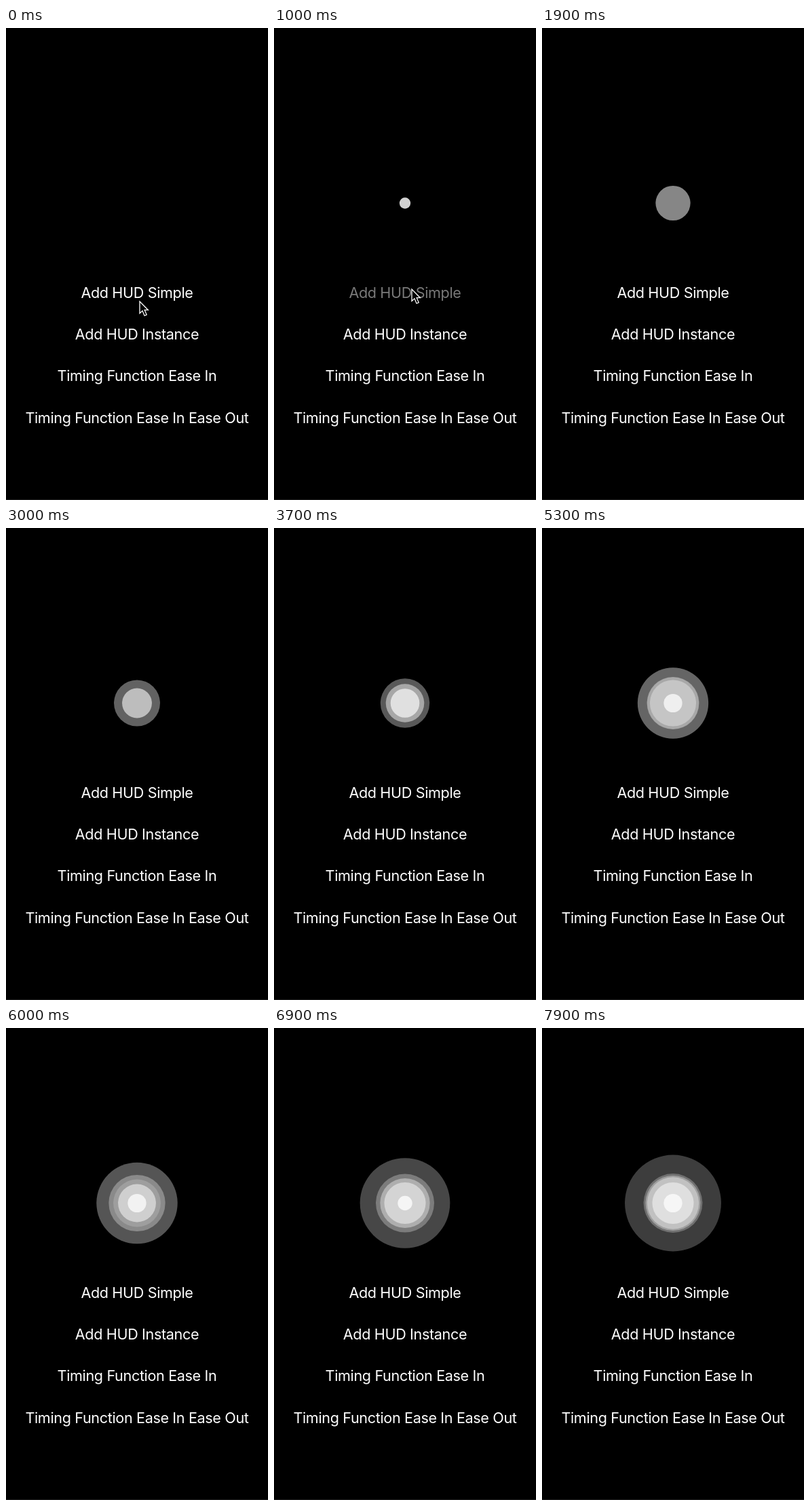
Recreate the animation shown at these times as an HTML page. Size 386x694 px, loop 8 s.

```html
<!DOCTYPE html>
<html lang="en">
<head>
<meta charset="utf-8">
<title>Pulse HUD</title>
<style>
  html, body { margin: 0; width: 100%; height: 100%; overflow: hidden; background: #000; }
  svg { display: block; }
  text { font: 21.6px Inter, Roboto, sans-serif; letter-spacing: -.36px; fill: #fff; text-anchor: middle; }
</style>
</head>
<body>
<svg width="386" height="694" viewBox="0 0 386 694">
  <rect y="693" width="386" height="1" fill="#1c1c1c"/>
  <g id="discs" fill="#fff"></g>
  <text id="tapped" x="193" y="397">Add HUD Simple</text>
  <text x="193" y="458.2">Add HUD Instance</text>
  <text x="193" y="519.2">Timing Function Ease In</text>
  <text x="193" y="580.7">Timing Function Ease In Ease Out</text>
  <path id="cursor" d="M0 0V17.5L4 13.8L7 21L10.2 19.6L7.2 12.7H12.4Z" fill="#000" stroke="#fff" stroke-width="1.3"/>
</svg>
<script>
const LOOP = 8, STEP = .1; // seconds
const byId = id => document.getElementById(id);
const clamp = (v, lo = 0, hi = 1) => Math.min(hi, Math.max(lo, v));
const ramp = (t, from, to) => clamp((t - from) / (to - from));
const set = (el, attrs) => Object.entries(attrs).forEach(([k, v]) => el.setAttribute(k, v));

// A pulse grows towards its full radius and settles with time constant tau
const pulse = (start, radius, tau = 1.05) => {
  const disc = document.createElementNS("http://www.w3.org/2000/svg", "circle");
  set(disc, { cx: 193, cy: 257.5 });
  byId("discs").append(disc);
  return { start, radius, tau, disc };
};
const pulses = [
  pulse(.75, 38.5), pulse(1.9, 36, 1.17), pulse(3.05, 78.3, 2.05), pulse(3.8, 43.5, .7),
  ...[4.9, 5.6, 6.6, 7.5].map(start => pulse(start, 43))
];

function drawPulse({ start, radius, tau, disc }, t) {
  const age = Math.max(0, t - start);
  const rest = Math.exp(-age / tau);
  const fade = ramp(age * 44 / radius, 6, 4);
  set(disc, { r: radius * (1 - rest), opacity: (.05 + 10 / radius + .65 * rest) * fade });
}

function draw(t) {
  pulses.forEach(p => drawPulse(p, t));
  const press = ramp(t, 0, .5), leave = ramp(t, 1.1, 1.5);
  set(byId("cursor"), {
    transform: `translate(${197 + 6 * press + 160 * leave} ${402 - 18 * press + 48 * leave})`,
    visibility: t < 1.6 ? "visible" : "hidden"
  });
  set(byId("tapped"), { opacity: t < .8 ? 1 : .3 + .7 * ramp(t, .9, 1.3) });
}

function tick() {
  const frame = Math.floor(performance.now() / 1000 % LOOP / STEP);
  draw(frame / 10);
  requestAnimationFrame(tick);
}
tick();
</script>
</body>
</html>
```
